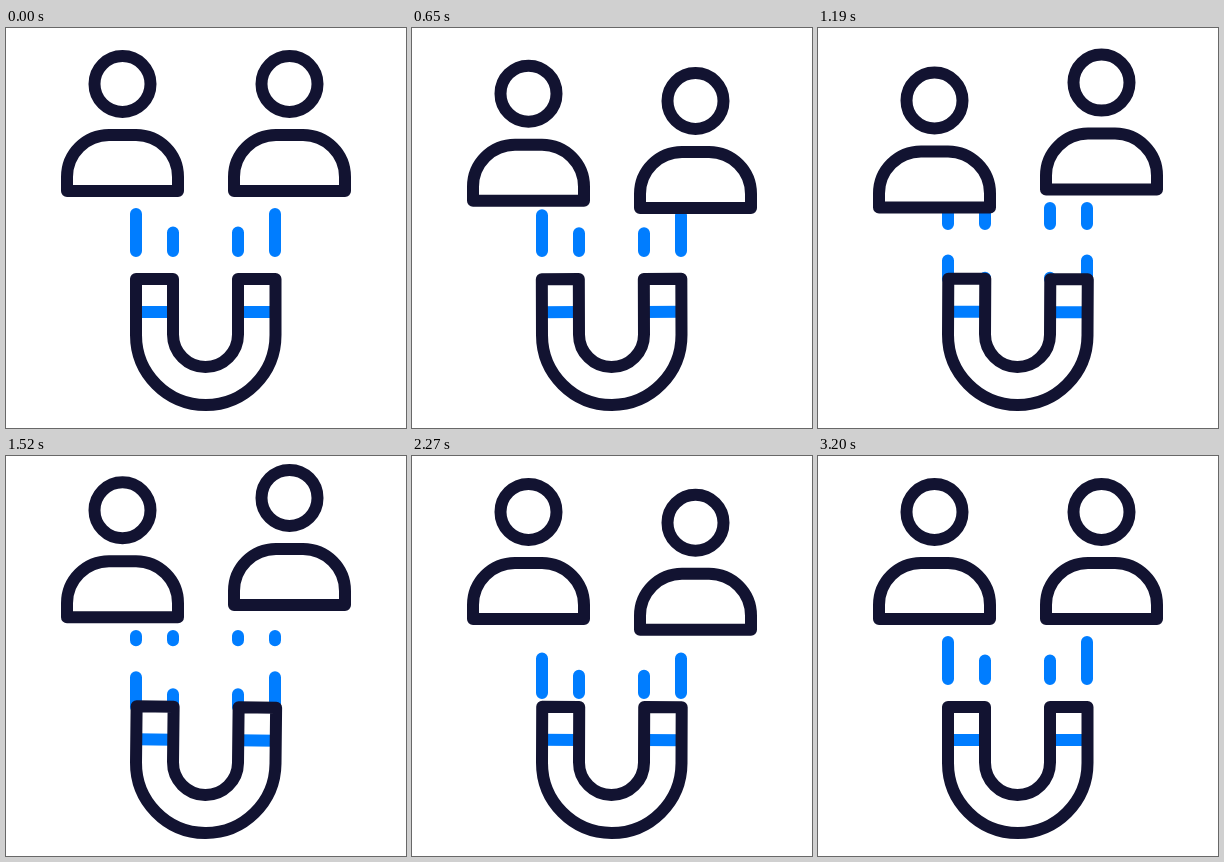
Animation, 400 px wide and 400 px high, one loop 3230 ms. Source, as an HTML page:

```html
<!DOCTYPE html>
<html lang="en">
<head>
<meta charset="utf-8">
<title>Magnet attracting people</title>
<style>
  html, body { margin: 0; width: 100%; height: 100%; overflow: hidden; background: #fff; }
  svg { display: block; width: 100vw; height: 100vh; }
</style>
</head>
<body>
<svg viewBox="0 0 400 400" fill="none" stroke="#121331" stroke-width="12" stroke-linecap="round" stroke-linejoin="round">
  <defs>
    <g id="person">
      <circle cx="116.5" cy="56" r="28"/>
      <path d="M61 163V149A42 42 0 0 1 103 107H130A42 42 0 0 1 172 149V163Z"/>
    </g>
  </defs>
  <path id="rays" stroke="#007dff"/>
  <g id="magnet">
    <path d="M130 284H167M232 284H269.5" stroke="#007dff" stroke-linecap="butt"/>
    <path d="M130 251H167V306.5A32.5 32.5 0 0 0 232 306.5V251H269.5V307A69.75 70 0 0 1 130 307Z"/>
  </g>
  <use id="left" href="#person"/>
  <use id="right" href="#person"/>
</svg>
<script>
const LOOP = 3230, HOLD = 200, STEP = 30, STEPS = 100;
const RAY_TOP = 180, RAY_BOTTOM = 251, RAY_SPAN = RAY_BOTTOM - RAY_TOP;
const SWING = 18.3, DAMPING = -.77, HALF_PERIOD = 26;

const el = id => document.getElementById(id);
const wave = (u, halfTurns) => Math.sin(Math.PI * halfTurns * u);
const ease = p => (1 - Math.cos(Math.PI * p)) / 2;

// Damped bob: three turning points, the first at step `first`, then back to rest
function bob(step, first) {
  const turn = k => k < 0 ? 0 : k > 2 ? STEPS : first + k * HALF_PERIOD;
  const height = k => k < 0 || k > 2 ? 0 : SWING * DAMPING ** k;
  const next = Math.min(3, Math.max(0, Math.floor((step - first) / HALF_PERIOD) + 1));
  const p = (step - turn(next - 1)) / (turn(next) - turn(next - 1));
  return height(next - 1) + (height(next) - height(next - 1)) * ease(p);
}

// A ray that leaves one end of its track re-enters at the other
function ray(x, end, length) {
  const tail = RAY_TOP + (((end - RAY_TOP) % RAY_SPAN) + RAY_SPAN) % RAY_SPAN;
  const start = tail - length;
  const line = (from, to) => `M${x} ${from.toFixed(2)}V${to.toFixed(2)}`;
  if (start >= RAY_TOP) return line(start, tail);
  return line(RAY_TOP, tail) + line(start + RAY_SPAN, RAY_BOTTOM);
}

function draw(ms) {
  const step = Math.max(0, Math.floor((ms % LOOP - HOLD) / STEP));
  const u = step / STEPS;
  el('left').setAttribute('transform', `translate(0 ${bob(step, 29)})`);
  el('right').setAttribute('transform', `translate(167 ${bob(step, 18.2)})`);
  el('magnet').setAttribute('transform', `rotate(${.35 * (wave(u, 1) - wave(u, 3))} 200 307)`);

  // One turn up the track, with an uneven pace
  const end = 223 - RAY_SPAN * u - 6 * wave(u, 1) + 8.4 * wave(u, 2) + 6.9 * wave(u, 4);
  const length = 37 - 3 * wave(u, 1);
  const outer = [130, 269].map(x => ray(x, end, length));
  const inner = [167, 232].map(x => ray(x, end, length / 2));
  el('rays').setAttribute('d', outer.concat(inner).join(''));
}

const begin = performance.now();
function tick() {
  draw(performance.now() - begin);
  requestAnimationFrame(tick);
}
tick();
</script>
</body>
</html>
```
